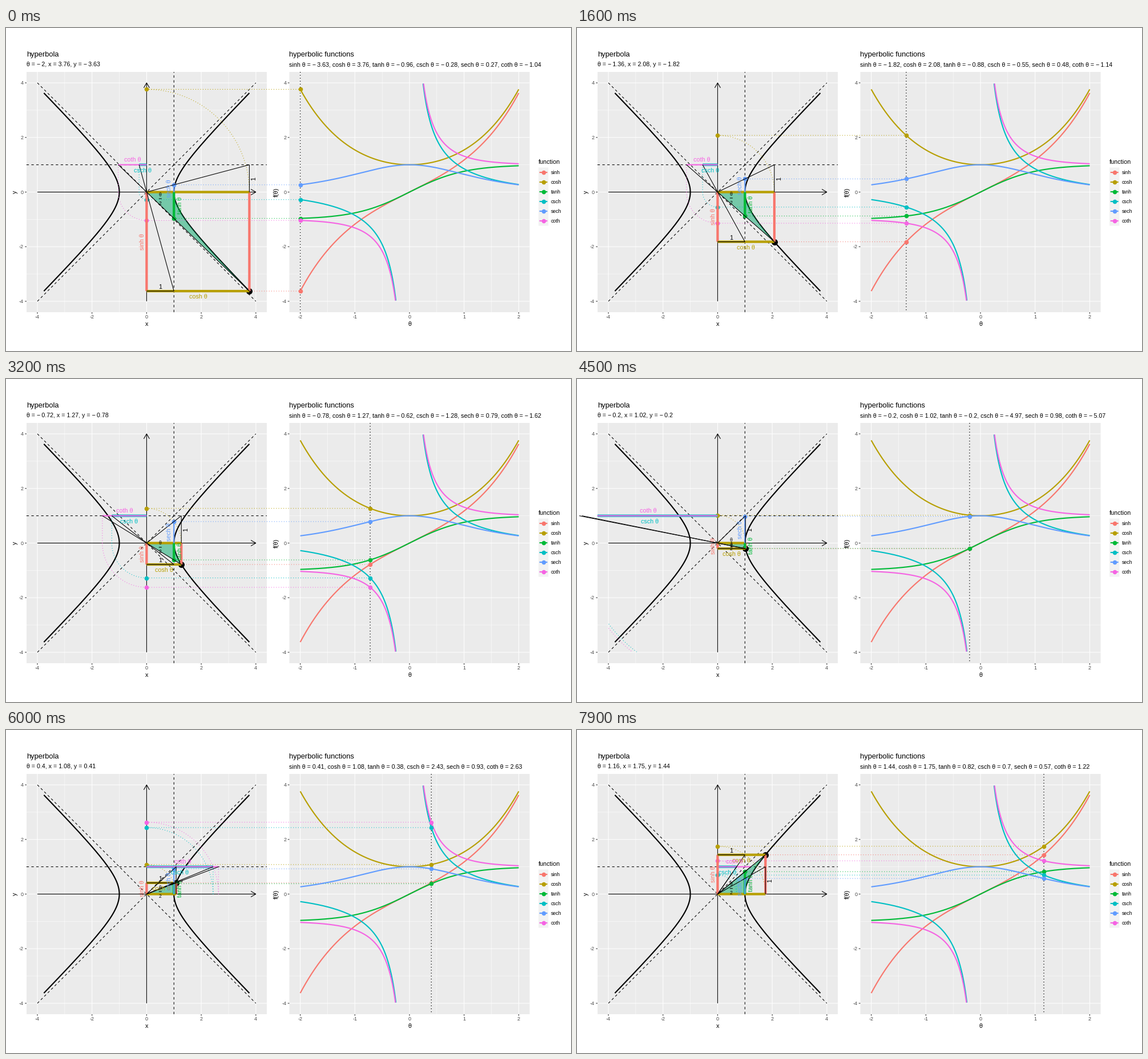
Write a matplotlib script that moves like this. It is 990x566 px and loops after 8000 ms.

```python
import matplotlib.pyplot as plt
import numpy as np
from matplotlib.animation import FuncAnimation
from matplotlib.patches import Polygon, Rectangle

W, H, FRAMES = 990, 566, 80
plt.rcParams.update({
    "font.family": "Liberation Sans",
    "path.snap": False,
    "lines.solid_capstyle": "butt",
    "lines.dash_capstyle": "butt",
})

COLORS = dict(sinh="#F8766D", cosh="#B79F00", tanh="#00BA38",
              csch="#00BFC4", sech="#619CFF", coth="#F564E3")
THIN, MID, THICK = 1.07, 2.13, 4.27
DASH, DOT = (0, (4, 4)), (0, (1, 3))
TOP, SIDE, LEFT, RIGHT = 77, 421, 36, 496.5
UNIT = 47.85
LIMIT, EDGE = 4, 4.4

fig = plt.figure(figsize=(W / 72, H / 72), dpi=72, facecolor="white")
ax = fig.add_axes([0, 0, 1, 1])
ax.set(xlim=(0, W), ylim=(H, 0))
ax.axis("off")
live = []


def lx(x):
    """Left panel x to pixels; infinities sit on the panel edge."""
    return 246.4 + UNIT * np.where(np.isinf(x), np.sign(x) * EDGE, x)


def rx(t):
    return 707 + 2 * UNIT * np.asarray(t)


def py(y):
    return 287.5 - UNIT * np.asarray(y)


def line(x, y, color="black", lw=THIN, ls="-", z=3):
    art, = ax.plot(x, y, color=color, lw=lw, ls=ls, zorder=z)
    live.append(art)


def seg(x0, y0, x1, y1, color="black", lw=THIN, ls="-"):
    line([lx(x0), lx(x1)], [py(y0), py(y1)], color, lw, ls)


def dot(x, y, color, size=7.6, z=3):
    art, = ax.plot([x], [y], "o", color=color, ms=size, mew=0, zorder=z)
    live.append(art)


def text(x, y, s, size=10.8, color="black", ha="center", rot=0):
    """Text whose capitals are centred on the given point."""
    shift = 0.36 * size
    if rot:
        x += shift
    else:
        y += shift
    live.append(ax.text(x, y, s, size=size, color=color, ha=ha, va="baseline",
                        rotation=rot, rotation_mode="anchor", zorder=3))


def box(x, y, w, h, color):
    ax.add_patch(Rectangle((x, y), w, h, fc=color, lw=0, zorder=1))


def functions(t):
    with np.errstate(divide="ignore"):
        s, c, h = np.sinh(t), np.cosh(t), np.tanh(t)
        return dict(sinh=s, cosh=c, tanh=h, csch=1 / s, sech=1 / c, coth=1 / h)


def num(v):
    if np.isinf(v):
        return "Inf"
    s = f"{abs(round(float(v), 2)):g}"
    return "\u2212\u2009" + s if v < 0 and s != "0" else s


def panel(x0, to_x, ticks, minor, title, xlabel):
    bottom, end = TOP + SIDE, x0 + SIDE
    box(x0, TOP, SIDE, SIDE, "#EBEBEB")
    for m in minor:
        line([to_x(m)] * 2, [TOP, bottom], "white", THIN / 2, z=2)
    for m in (-3, -1, 1, 3):
        line([x0, end], [py(m)] * 2, "white", THIN / 2, z=2)
    for v in ticks:
        x = to_x(v)
        line([x, x], [TOP, bottom], "white", z=2)
        line([x, x], [bottom, bottom + 2.75], "#333333")
        text(x, 506.2, str(v), 9, "#4D4D4D")
    for v in (-4, -2, 0, 2, 4):
        y = py(v)
        line([x0, end], [y, y], "white", z=2)
        line([x0 - 2.75, x0], [y, y], "#333333")
        text(x0 - 5, y, str(v), 9, "#4D4D4D", ha="right")
    text(x0, 45.4, title, 12.9, ha="left")
    text(to_x(0), 518, xlabel)


def draw_left():
    panel(LEFT, lx, (-4, -2, 0, 2, 4), (-3, -1, 1, 3), "hyperbola", "x")
    text(14.8, 287.5, "y", rot=90)
    seg(-4, 0, 4, 0)
    seg(0, -4, 0, 4)
    tip_x, tip_y, mid_x, mid_y = lx(4), py(4), lx(0), py(0)
    line([tip_x - 8.7, tip_x, tip_x - 8.7], [mid_y - 5, mid_y, mid_y + 5])
    line([mid_x - 5, mid_x, mid_x + 5], [tip_y + 8.7, tip_y, tip_y + 8.7])
    seg(-4, -4, 4, 4, ls=DASH)
    seg(-4, 4, 4, -4, ls=DASH)
    seg(-EDGE, 1, EDGE, 1, ls=DASH)
    seg(1, -EDGE, 1, EDGE, ls=DASH)
    t = np.linspace(-2, 2, 201)
    for side in (-1, 1):
        line(lx(side * np.cosh(t)), py(np.sinh(t)), lw=MID)


def draw_right():
    panel(RIGHT, rx, range(-2, 3), (-1.5, -0.5, 0.5, 1.5),
          "hyperbolic functions", "θ")
    text(473, 287.5, "f(θ)", rot=90)
    t = np.linspace(-2, 2, 2000)
    for name, v in functions(t).items():
        v = np.where(np.abs(v) <= LIMIT, v, np.nan)
        line(rx(t), py(v), COLORS[name], MID, z=5)


def draw_legend():
    text(933, 234, "function", ha="left")
    for i, (name, color) in enumerate(COLORS.items()):
        y = 253 + 17 * i
        box(933, y - 8.5, 17.3, 17.1, "#F2F2F2")
        line([934.7, 948.6], [y, y], color, MID)
        dot(941.6, y, color)
        text(955, y, name, 8.8, ha="left")


def dotted_guides(t, f):
    c, s = f["cosh"], f["sinh"]
    a = np.linspace(0, np.pi / 2, 200)
    for name in ("cosh", "csch", "coth"):
        r, color = f[name], COLORS[name]
        if np.isinf(r):
            continue
        x, y = r * np.cos(a), r * np.sin(a)
        hidden = (np.abs(x) > LIMIT) | (np.abs(y) > LIMIT)
        line(lx(np.where(hidden, np.nan, x)), py(y), color, ls=DOT)
        if name != "cosh" and abs(r) <= LIMIT:
            seg(r, 1, r, 0, color, ls=DOT)
    starts = dict(sinh=c, cosh=0, tanh=1, csch=0, sech=1, coth=0)
    for name, x in starts.items():
        v, color = f[name], COLORS[name]
        if abs(v) > LIMIT:
            continue
        line([lx(x), rx(t)], [py(v)] * 2, color, ls=DOT)
        if name != "sinh":
            dot(lx(x), py(v), color)
        dot(rx(t), py(v), color, z=6)
    dot(lx(c), py(s), "black", 11)


def bars(f):
    def bar(name, x0, y0, x1, y1, lw=THICK):
        seg(x0, y0, x1, y1, COLORS[name], lw)

    def capped(v):
        return v if abs(v) <= LIMIT else np.copysign(EDGE, v)

    c, s = f["cosh"], f["sinh"]
    bar("csch", 0, 1, capped(f["csch"]), 1)
    bar("coth", 0, 1, capped(f["coth"]), 1, MID)
    bar("sinh", 0, 0, 0, s)
    bar("sinh", c, 0, c, s)
    bar("cosh", 0, 0, c, 0)
    bar("cosh", 0, s, c, s)
    bar("tanh", 1, 0, 1, f["tanh"])
    bar("sech", 1, 0, 1, f["sech"], MID)


def thin_lines(f):
    c, s = f["cosh"], f["sinh"]
    for x, y in ((f["csch"], 1), (1, s), (f["coth"], 1), (c, s), (c, 1)):
        seg(0, 0, x, y)
    seg(c, 0, c, 1)
    seg(0, s, 1, s)


def labels(f):
    c, s = f["cosh"], f["sinh"]
    places = dict(
        sinh=(lx(0) - 8.4, py(s / 2), 90),
        cosh=(lx(c / 2), py(s) + 9.2, 0),
        tanh=(lx(1) + 9.6, py(f["tanh"] / 2), 90),
        csch=(lx(f["csch"] / 2), py(1) + 9.5, 0),
        sech=(lx(1) - 9, py(f["sech"] / 2), 90),
        coth=(lx(f["coth"] / 2), py(1) - 9.2, 0),
    )
    for name, (x, y, rot) in places.items():
        text(x, y, name + " θ", color=COLORS[name], rot=rot)
    text(lx(c) + 7.2, py(0.5), "1", rot=90)
    x = lx(0.5)
    text(x, py(s) - 7.5, "1")
    y = py(f["tanh"] / 4)
    text(x, y - 7.5, "θ", 8.5)
    text(x, y + 7.5, "2", 8.5)
    line([x - 2.5, x + 2.5], [y, y])


def update(i):
    while live:
        live.pop().remove()
    t = np.float64(round(-2 + 0.04 * i, 10))
    f = functions(t)

    text(LEFT, 63.6, f"θ = {num(t)}, x = {num(f['cosh'])}, y = {num(f['sinh'])}",
         10.64, ha="left")
    text(RIGHT, 63.6, ", ".join(f"{k} θ = {num(v)}" for k, v in f.items()),
         10.64, ha="left")

    arc = np.linspace(0, t, 60)
    xs = np.append(0, np.cosh(arc))
    ys = np.append(0, np.sinh(arc))
    sector = Polygon(np.column_stack([lx(xs), py(ys)]), fc="#00A968",
                     alpha=0.5, lw=0, zorder=3)
    live.append(ax.add_patch(sector))

    line([rx(t)] * 2, [TOP, TOP + SIDE], lw=1.3, ls=DOT)
    dotted_guides(t, f)
    bars(f)
    thin_lines(f)
    labels(f)
    return list(live)


draw_left()
draw_right()
draw_legend()
live.clear()  # the artists so far stay for good

anim = FuncAnimation(fig, update, frames=FRAMES, interval=100,
                     init_func=lambda: [], repeat=True, blit=False)
plt.show()
```
